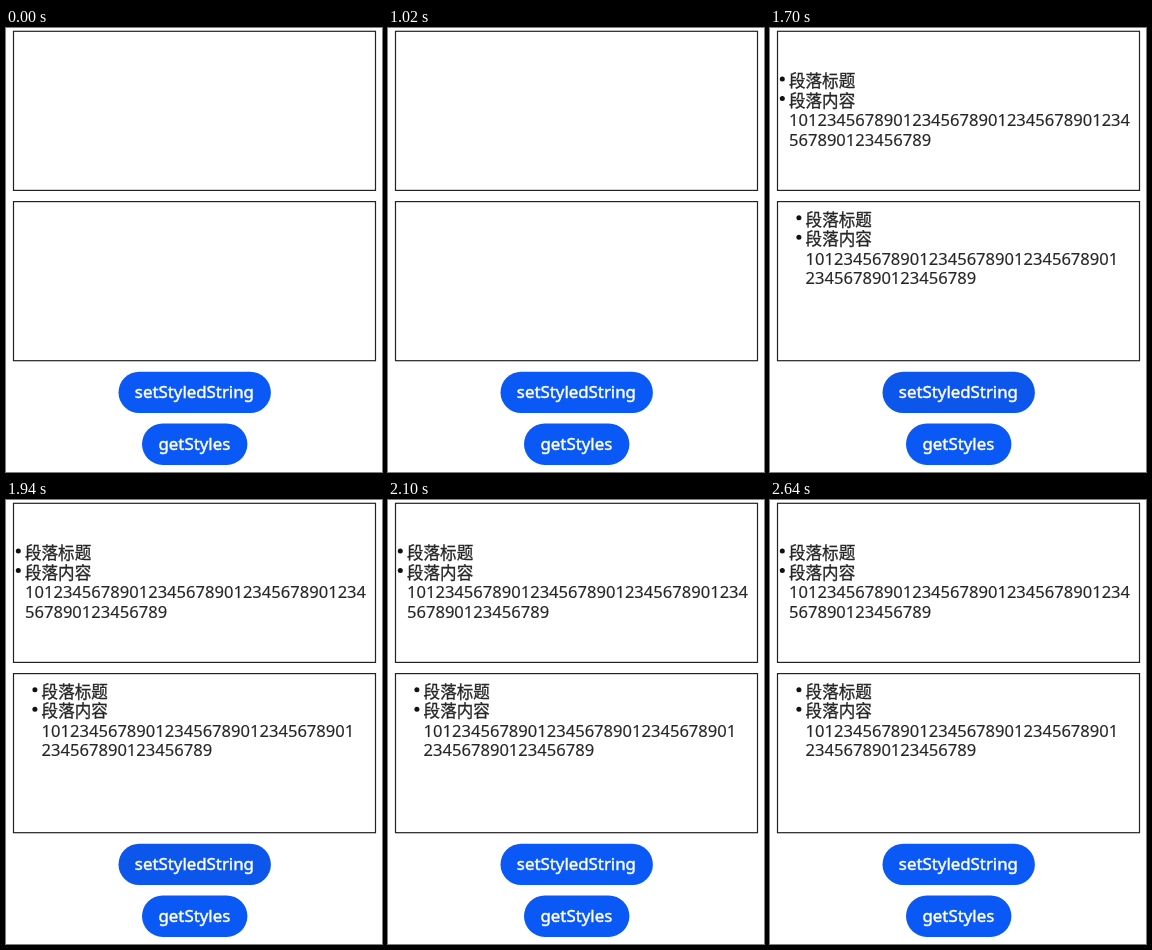
Write an HTML page that moves like this. It is 376 px wide and 444 px high and loops after 3000 ms.

```html
<!DOCTYPE html>
<html lang="zh">
<head>
<meta charset="utf-8">
<style>
  html, body { margin: 0; width: 100%; height: 100%; overflow: hidden; background: #fff; }
  svg { display: block; width: 376px; height: 444px; }
  text { font: 16.57px "Noto Sans", "Noto Sans CJK SC", "Noto Sans CJK", sans-serif; fill: #262626; stroke: #262626; stroke-width: .15; }
  .zh { font-family: "Noto Sans CJK SC", "Noto Sans CJK", sans-serif; stroke-width: .3; }
  .label { font-size: 16.85px; fill: #fff; stroke: #fff; stroke-width: .45; text-anchor: middle; }
  .frame { fill: none; stroke: #222; stroke-width: 1.2; }
</style>
</head>
<body>
<svg id="stage" viewBox="0 0 376 444"></svg>
<script>
const LOOP = 3000, PRESS = 1700, RELEASE = 2100;
const BLUE = '#0a59f7', PRESSED = '#0d56ec';
const stage = document.getElementById('stage');

function add(parent, tag, attrs, text = '') {
  const node = document.createElementNS('http://www.w3.org/2000/svg', tag);
  for (const key in attrs) node.setAttribute(key, attrs[key]);
  node.textContent = text;
  return parent.appendChild(node);
}

function frame(top, bottom) {
  add(stage, 'rect', { class: 'frame', x: 7.5, y: top, width: 362, height: bottom - top });
}

function button(y, width, label) {
  const x = 188.7 - width / 2;
  const pill = add(stage, 'rect', { x, y, width, height: 41.4, rx: 20.7, fill: BLUE });
  add(stage, 'text', { class: 'label', x: 188.4, y: y + 26.5 }, label);
  return pill;
}

// Two bulleted paragraphs; the second one wraps its digits after `split` characters.
function paragraphs(x, y, split) {
  const group = add(stage, 'g', {});
  const digits = '1' + '0123456789'.repeat(5);
  const lines = ['段落标题', '段落内容', digits.slice(0, split), digits.slice(split)];
  lines.forEach((line, i) => {
    const base = y + i * 19.5;
    if (i < 2) add(group, 'circle', { cx: x - 6.7, cy: base - 8.2, r: 2.5, fill: '#111' });
    add(group, 'text', { class: i < 2 ? 'zh' : '', x, y: base }, line);
  });
  return group;
}

frame(3.3, 162.4);
frame(173.6, 332.7);

const content = [paragraphs(19, 59.2, 36), paragraphs(35.6, 197.9, 33)];
const setButton = button(343.7, 152.4, 'setStyledString');
button(395.5, 105.4, 'getStyles');

function render(t) {
  for (const group of content) group.setAttribute('visibility', t < PRESS ? 'hidden' : 'visible');
  setButton.setAttribute('fill', t >= PRESS && t < RELEASE ? PRESSED : BLUE);
}

const start = performance.now();
function tick() {
  render((performance.now() - start) % LOOP);
  requestAnimationFrame(tick);
}
tick();
</script>
</body>
</html>
```
